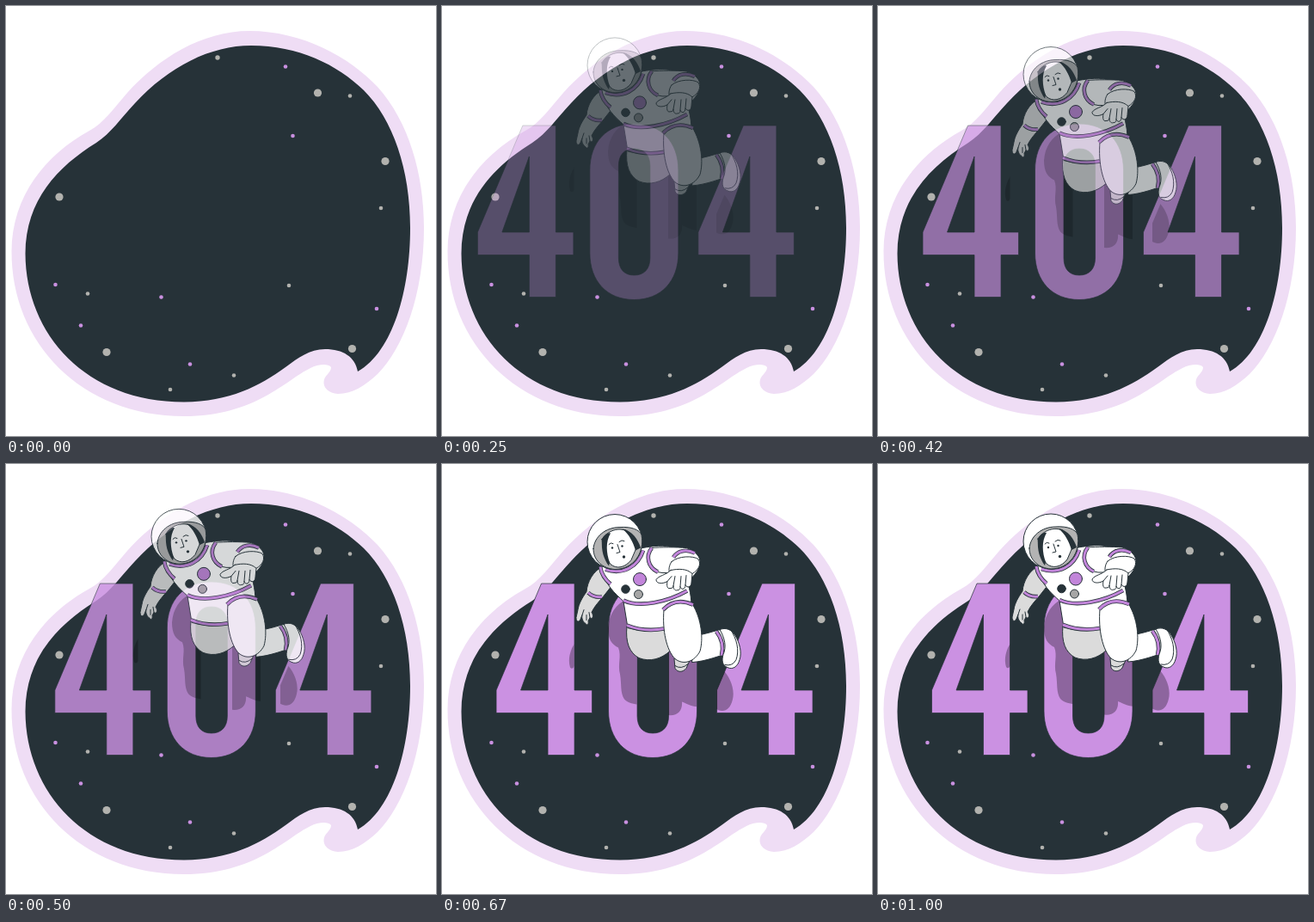
Recreate the animation shown at these times as an HTML page. Size 500x500 px, loop 1.04 s.

```html
<!DOCTYPE html>
<html lang="en">
<head>
<meta charset="utf-8">
<title>404 in space</title>
<style>
  html, body { margin: 0; width: 100%; height: 100%; overflow: hidden; background: #fff; }
  svg { display: block; width: 100vw; height: 100vh; }
  #digits, #astronaut { opacity: 0; }
  #digits { fill: #cb91e2; stroke: #263238; stroke-width: .7; }
  .suit { fill: #fff; stroke: #263238; stroke-width: 1; stroke-linejoin: round; stroke-linecap: round; }
  .shade { fill: #dbdbdb; }
  .line { fill: none; }
  .ink { fill: #263238; stroke: none; }
  .edge { fill: none; stroke: #263238; stroke-width: 4.6; stroke-linecap: butt; }
  .band { fill: none; stroke: #c285da; stroke-width: 3; stroke-linecap: butt; }
</style>
</head>
<body>
<svg viewBox="0 0 500 500">
  <defs>
    <path id="four" fill-rule="evenodd" clip-rule="evenodd" d="M115 139H153.500V263H174V289.500H153.500V338.500H122.500V289.500H62.500V263ZM122.500 175L91 263H122.500Z"/>
    <path id="zero" fill-rule="evenodd" clip-rule="evenodd" d="M193 191C193 158 213 137 244.500 137S296 158 296 191V287C296 320 276 341.500 244.500 341.500S193 320 193 287ZM226.500 186V293C226.500 306 233 313 244.500 313S263 306 263 293V186C263 173 256 166 244.500 166S226.500 173 226.500 186Z"/>
    <clipPath id="cut">
      <use href="#four"/>
      <use href="#zero"/>
      <use href="#four" x="256.500"/>
    </clipPath>
  </defs>

  <path fill="#efddf5" d="M283 29C228 29 177 61 141 101C126 118 114 136 97 145C46 173 7 221 6.500 285C6 392 88 477 207 477C290 477 325 435 354 421C362 417 374 415 378 420C378 427 370 429 369.500 437C369 444 375 450 386 451C403 451 418 441 432 428C462 398 486 335 486 258C486 195 468 134 432 94C400 60 345 29 283 29Z"/>
  <path fill="#263238" d="M285 46C238 46 190 70 150 113C133 131 122 148 105 159C60 187 23 225 22.500 288C23 382 93 460.500 207 460.500C260 460 295 442 325 420C340 409 353 399 371 399C392 399 406 408 409 425C450 402 470 330 470 258C470 190 450 132 416 98C385 68 340 46 285 46Z"/>
  <g id="stars"></g>

  <g id="digits">
    <use href="#four"/>
    <use href="#zero"/>
    <use href="#four" x="256.500"/>
  </g>

  <g id="astronaut">
    <g clip-path="url(#cut)" opacity=".3">
      <path d="M156 206C149 214 146 227 149 236C152 240 155 234 156 226Z"/>
      <path d="M213 158C203 162 194 174 193 190C193 203 197 209 205 213C209 223 204 232 207 244C209 256 207 265 212 273C217 278 223 278 230 280V160Z"/>
      <path d="M260 200H300V282C292 282 286 279 279 276C280 287 273 294 260 291Z"/>
      <path d="M326 238C334 246 341 260 338 273C335 287 326 289 318 284V246Z"/>
    </g>

    <g class="suit">
      <!-- rear limbs -->
      <path class="shade" d="M186 119C176 124 169 136 168 148C163 155 159 162 158 169L156 178C156 183 159 184 161 180L163 175C162 179 164 183 167 185C169 188 171 185 170 182L172 178C175 181 177 176 174 172C177 165 183 159 188 153L199 139Z"/>
      <path class="line" d="M163 175L165 169M168 181L168 175M172 178L171 172"/>
      <path class="edge" d="M170 149Q176 155 186 154"/><path class="band" d="M170 149Q176 155 186 154"/>
      <path class="shade" d="M270 226L271 237C274 242 280 242 284 237L288 228Z"/>
      <path class="line" d="M271 234Q278 239 286 232"/>
      <path class="shade" d="M215 188C213 207 218 219 229 225C242 230 255 226 265 217L262 185Z"/>

      <!-- torso -->
      <path d="M184 120C190 140 201 150 211 159L216 190Q235 196 259 191L290 165C290 150 286 137 282 126L270 97C258 93 245 95 233 97Z"/>
      <path class="edge" d="M211 158C230 167 262 160 285 147M215 187Q235 195 258 191M184 119Q186 131 196 139"/>
      <path class="band" d="M211 158C230 167 262 160 285 147M215 187Q235 195 258 191M184 119Q186 131 196 139"/>
      <circle cx="230" cy="133.500" r="7.500" fill="#c285da"/>
      <circle cx="213.500" cy="145" r="4.800" fill="#263238"/>
      <circle cx="228.500" cy="151" r="5" fill="#a6a6a6"/>

      <!-- front leg -->
      <path d="M293 199C305 198 315 194 327 191L337 218C324 222 307 229 291 230Z"/>
      <path class="edge" d="M319 194Q329 207 325 222"/><path class="band" d="M319 194Q329 207 325 222"/>
      <path d="M323 192C330 189 337 192 341 199C346 207 349 219 346 227C344 235 338 239 332 236C326 234 325 228 327 221C331 212 329 202 323 192Z"/>
      <path class="line" d="M335 191C343 203 346 216 342 227Q338 235 329 233"/>
      <path d="M258 169C256 193 261 216 271 226C281 234 294 229 300 217C304 203 302 180 291 162Q273 154 258 169Z"/>
      <path class="edge" d="M257 169Q271 154 292 163"/><path class="band" d="M257 169Q271 154 292 163"/>

      <!-- front arm -->
      <path d="M243 97C254 96 273 96 284 97C294 100 301 107 300 115C299 122 295 127 291 131L266 126Q256 127 246 124C237 117 237 105 243 97Z"/>
      <path class="edge" d="M244 97C236 107 240 120 251 125M269 108C274 100 284 98 294 103"/>
      <path class="band" d="M244 97C236 107 240 120 251 125M269 108C274 100 284 98 294 103"/>
      <path d="M267 113C275 106 292 106 298 110C302 116 298 123 291 127L265 128C263 123 264 117 267 113Z"/>
      <path d="M266 123C260 129 252 129 249 134C249 139 257 139 262 136C261 141 262 145 265 144C268 144 269 143 269 141C269 146 272 147 274 146C277 146 277 144 277 142C278 146 283 146 283 140C285 144 290 143 290 137L291 127C285 121 275 121 266 123Z"/>
      <path class="line" d="M262 136L267 130M269 141L271 130M277 142L278 130M283 140L284 129"/>

      <!-- helmet -->
      <path class="edge" d="M190 122C210 129 228 119 234 100"/><path class="band" d="M190 122C210 129 228 119 234 100"/>
      <circle cx="201" cy="90" r="32"/>
      <path fill="#b3b3b3" d="M176 98C177 84 190 73 207 73C220 72 230 76 232 82C236 102 223 122 201 122C187 121 176 112 176 98Z"/>
      <path d="M186 87C192 77 206 72 216 78L226 97L220 111C213 120 203 122 196 116C190 108 187 98 186 87Z"/>
      <path class="ink" d="M186 87C189 81 193 79 196 80C190 90 191 103 195 114L194 118C188 110 185 100 186 87ZM210 75C221 77 228 87 231 97L225 100C222 90 218 82 210 75Z"/>
      <path class="line" d="M194 93Q196 90 199 92M206 90Q209 87 212 89M204 93L207 102L203 103"/>
      <g class="ink"><circle cx="198" cy="97" r="1.200"/><circle cx="209.500" cy="95" r="1.200"/><circle cx="211.500" cy="107.500" r="1.700"/></g>
    </g>
  </g>
</svg>

<script>
  const GREY = '#b2b2ae', PURPLE = '#c990e0';
  const starGroups = [
    [GREY, 4.6, [362.5, 101, 441, 180.5, 62, 222, 117, 402.5, 402.5, 398.5]],
    [GREY, 2.7, [246, 60]],
    [GREY, 2.3, [400, 104.5, 436, 235, 329, 325, 265, 429.5, 191, 446, 95, 334.5]],
    [PURPLE, 2.3, [325, 70.5, 333.5, 151, 431, 352, 180.5, 338.5, 57.5, 324, 87, 371.5, 214, 416.5]]
  ];
  const stars = document.getElementById('stars');
  for (const [fill, r, at] of starGroups) {
    for (let i = 0; i < at.length; i += 2) {
      const dot = document.createElementNS(stars.namespaceURI, 'circle');
      const attrs = { cx: at[i], cy: at[i + 1], r, fill };
      for (const name in attrs) dot.setAttribute(name, attrs[name]);
      stars.append(dot);
    }
  }

  const bezier = (a, b, t) => 3 * a * t * (1 - t) ** 2 + 3 * b * t * t * (1 - t) + t ** 3;

  // cubic-bezier(.36, -.01, .5, 1.38)
  function ease(x) {
    if (x >= 1) return 1;
    let lo = 0, hi = 1;
    for (let i = 0; i < 24; i++) {
      const mid = (lo + hi) / 2;
      if (bezier(.36, .5, mid) < x) lo = mid; else hi = mid;
    }
    return bezier(-.01, 1.38, lo);
  }

  const LOOP = 1040, HOLD = 80, FPS = 24, TRAVEL = 30;
  const digits = document.getElementById('digits');
  const astronaut = document.getElementById('astronaut');
  const start = performance.now();

  function draw() {
    const time = (performance.now() - start) % LOOP;
    const step = Math.floor((time - HOLD) * FPS / 1000 + .01);
    const p = time < HOLD ? 0 : ease(.12 + step / FPS);
    const shift = TRAVEL * (p - 1);
    digits.setAttribute('transform', `translate(${shift} 0)`);
    astronaut.setAttribute('transform', `translate(0 ${shift})`);
    digits.style.opacity = astronaut.style.opacity = Math.min(1, p);
    requestAnimationFrame(draw);
  }
  draw();
</script>
</body>
</html>
```
